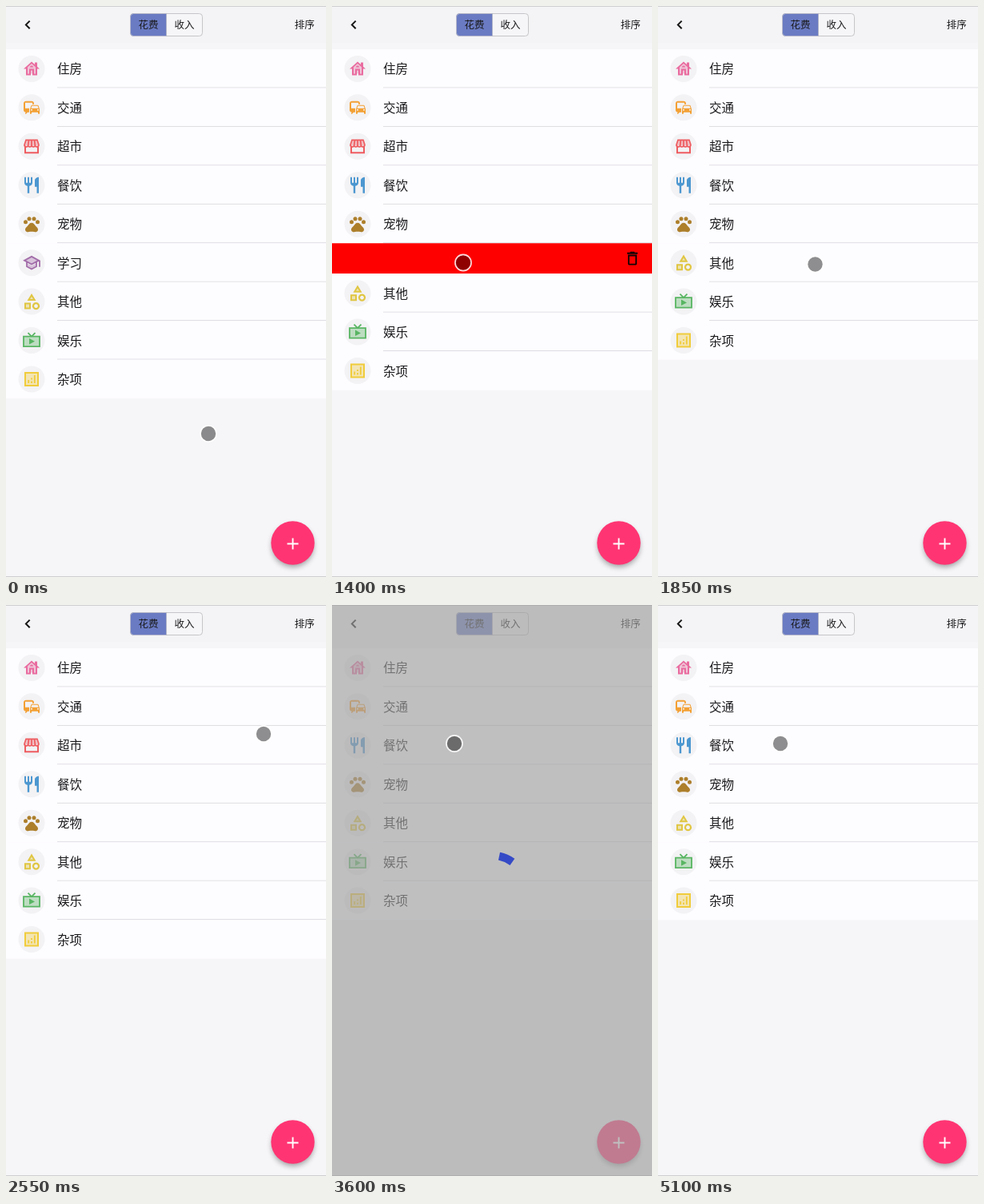
An HTML page for the animation above (5150 ms loop, 400x713 px).

```html
<!DOCTYPE html>
<html lang="zh-CN">
<head>
<meta charset="utf-8">
<title>分类列表</title>
<style>
  html, body { margin: 0; width: 100%; height: 100%; overflow: hidden; background: #f6f5f8; }
  svg { display: block; width: 100vw; height: 100vh; }
  text { font-family: "Noto Sans CJK SC", "Noto Sans CJK", sans-serif; fill: #1b1b1d; }
</style>
</head>
<body>
<svg id="stage" viewBox="0 0 400 713">
  <defs>
    <filter id="blur" x="-50%" y="-50%" width="200%" height="200%"><feGaussianBlur stdDeviation="3.5"/></filter>
  </defs>
  <rect width="400" height="713" fill="#f6f5f8"/>
  <rect width="400" height="46" fill="#f4f3f5"/>
  <rect id="sheet" y="54" width="400" fill="#fdfcff"/>
  <g id="rows"></g>
  <path d="M29.7 18.6L24.9 23.4L29.7 28.2" fill="none" stroke="#151515" stroke-width="2"/>
  <rect x="155.5" y="9.5" width="90" height="28" rx="4" fill="#f6f5f7" stroke="#c6c5c9"/>
  <path d="M200.5 9.5H159.5a4 4 0 0 0-4 4v20a4 4 0 0 0 4 4H200.5z" fill="#6a7bc3" stroke="#b4b7c9"/>
  <g font-size="12.5" text-anchor="middle">
    <text x="178" y="28.3">花费</text>
    <text x="223" y="28.3">收入</text>
    <text x="373.3" y="28.3">排序</text>
  </g>
  <circle cx="358.5" cy="674.5" r="26" fill="#000" opacity=".36" filter="url(#blur)"/>
  <circle cx="358.5" cy="670.5" r="27.2" fill="#ff3573"/>
  <path d="M351.5 671.5h14M358.5 664.5v14" stroke="#fff" stroke-width="1.9"/>
  <path d="M0 .5H400M0 712.5H400" stroke="#cfced1"/>
  <g id="loading">
    <rect width="400" height="713" fill="#a0a0a0" fill-opacity=".66"/>
    <path id="arc" fill="none" stroke="#354ac6" stroke-width="10"/>
  </g>
  <g id="pointer">
    <circle id="ring" r="21" fill="none" stroke="#000" stroke-width="1.8"/>
    <circle r="10" fill="none" stroke="#fff" stroke-width="1.8" opacity=".85"/>
    <circle r="9.2" fill="#000" fill-opacity=".44"/>
  </g>
</svg>
<script>
const LOOP = 5150, STEP = 50, ROW = 48.45, TOP = 54;
const $ = id => document.getElementById(id);

const line = (d, width = 2) =>
  `<path d="${d}" fill="none" stroke="currentColor" stroke-width="${width}"/>`;
const solid = d => `<path d="${d}" fill="currentColor" fill-rule="evenodd"/>`;
const tone = d => `<path d="${d}" fill="currentColor" opacity=".35"/>`;
const dot = (x, y, r) => `<circle cx="${x}" cy="${y}" r="${r}" fill="currentColor"/>`;

// Icons live in a 24-unit box.
const items = [
  ['住房', '#e96c9f', tone('M7 10.2l5-4.5 5 4.5V18H7z') +
    solid('M19 9.3V4h-3v2.6L12 3 2 12h3v8h6v-6h2v6h6v-8h3zM17 18h-2v-6H9v6H7v-7.8l5-4.5 5 4.5zM10 10h4c0-1.1-.9-2-2-2s-2 .9-2 2z')],
  ['交通', '#f3a033',
    solid('M12 4H5C3.3 4 2 5.3 2 7v8c0 1.7 1.3 3 3 3l-1 1v1h1l2-2h2v-5H4V6h9v2h2V7c0-1.7-1.3-3-3-3z') +
    solid('M20.6 9.7c-.2-.4-.5-.7-1-.7h-7.2c-.5 0-.8.3-1 .7L10 13.8v5.5c0 .4.3.7.7.7h.6c.4 0 .7-.4.7-.8V18h8v1.2c0 .4.3.8.7.8h.6c.4 0 .7-.3.7-.7v-5.5zM12.4 10h7.2l1 3h-9.2zM12 16a1 1 0 1 1 0-2 1 1 0 0 1 0 2zM20 16a1 1 0 1 1 0-2 1 1 0 0 1 0 2z')],
  ['超市', '#ee5c60', tone('M5 4h14l2 7H3z') +
    line('M5 4h14l1.8 5.5a2 2 0 0 1-4.4 1.5 2.3 2.3 0 0 1-4.4 0 2.3 2.3 0 0 1-4.4 0A2 2 0 0 1 3.2 9.5zM12 4v7M8.5 4l-.9 7M15.5 4l.9 7', 1.7) +
    line('M4 11.5V20h16v-8.5')],
  ['餐饮', '#4c97d0',
    solid('M11 9H9V2H7v7H5V2H3v7c0 2.1 1.7 3.8 3.8 4v9h2.4v-9c2.1-.2 3.8-1.9 3.8-4V2h-2zM16 6v8h2.5v8H21V2c-2.8 0-5 2.2-5 4z')],
  ['宠物', '#ad7f2b',
    dot(4.5, 9.5, 2.5) + dot(9, 5.5, 2.5) + dot(15, 5.5, 2.5) + dot(19.5, 9.5, 2.5) +
    solid('M17.3 14.9l-2.4-3c-1.6-1.8-4.2-1.8-5.8 0l-2.4 3c-1.3 1.3-3 2.7-2.7 4.7.3 1.1 1 2.1 2.4 2.4.7.1 3-.5 5.6-.5s4.9.6 5.6.5c1.4-.3 2.1-1.3 2.4-2.4.3-2-1.4-3.4-2.7-4.7z')],
  ['学习', '#a26ca9', tone('M12 4L3 9l9 5 9-5zM7 13v3l5 3 5-3v-3l-5 2.5z') +
    line('M12 4.2L3 9l9 4.9L21 9zM6 11.2v5.4l6 3.2 6-3.2v-5.4M22 9v8', 1.8)],
  ['其他', '#e0c642', tone('M12 4L8 10h8zM4 14h6v6H4z') +
    line('M12 3.9L8.3 10h7.4zM4 14.5h6v6H4z') + line('M17.5 14a3.5 3.5 0 1 0 .01 0z', 2.2)],
  ['娱乐', '#58b562', tone('M2 7h20v12H2z') +
    line('M2 7h20v12.5H2zM7.5 2.5L12 7l4.5-4.5', 1.8) + solid('M9 9.5v7.5l7-3.7z')],
  ['杂项', '#f0cc3b', tone('M4 4h16v16H4z') + line('M4 4h16v16H4z') +
    line('M8.2 17v-4M12 17v-2.5M12 12.5v-2M15.8 17V7', 1.8)]
];

const trash = solid('M6 19c0 1.1.9 2 2 2h8c1.1 0 2-.9 2-2V7H6zM8 9h8v10H8zM15.5 4l-1-1h-5l-1 1H5v2h14V4z');

$('rows').innerHTML = items.map(([label, color, icon], i) => `
  <g class="row">
    <rect class="red" width="400"/>
    <g class="trash" color="#140405">${trash}</g>
    <g class="content">
      <rect width="400" height="${ROW}" fill="#fdfcff"/>
      <circle cx="32" cy="24.4" r="16.5" fill="#f3f2f4"/>
      <g transform="translate(20 12.4)" color="${color}">${icon}</g>
      <text x="64" y="30.4" font-size="15.5">${label}</text>
      ${i < items.length - 1 ? '<path d="M64 48H400" stroke="#d9d8dc"/>' : ''}
    </g>
  </g>`).join('');

const rows = [...document.querySelectorAll('.row')].map(group => ({
  group,
  red: group.querySelector('.red'),
  trash: group.querySelector('.trash'),
  content: group.querySelector('.content')
}));

const clamp = (v, lo = 0, hi = 1) => Math.min(hi, Math.max(lo, v));
const lerp = (a, b, k) => a + (b - a) * k;
const span = (t, from, to) => clamp((t - from) / (to - from));
const smooth = k => k * k * (3 - 2 * k);
const linear = k => k;

// time, x, y, easing used to arrive there
const track = [
  [0, 253, 534, linear], [450, 341, 323, smooth], [830, 341, 323, linear],
  [1050, 274, 322.5, linear], [1280, 164, 320.5, linear], [1550, 164, 320.5, linear],
  [1850, 196.5, 322.5, smooth], [2450, 322, 161, smooth], [3040, 322, 161, linear],
  [3200, 213, 161.5, linear], [3300, 153, 173, linear], [LOOP, 153, 173, linear]
];

const swipes = [
  { row: 5, press: 700, drag: 830, release: 1280, startX: 341, busy: 1460, done: 1820 },
  { row: 2, press: 2700, drag: 3040, release: 3300, startX: 322, busy: 3520, done: 3900 }
];

function pointerAt(t) {
  const i = Math.max(1, track.findIndex(p => p[0] >= t));
  const a = track[i - 1], b = track[i];
  const k = b[3](span(t, a[0], b[0]));
  return [lerp(a[1], b[1], k), lerp(a[2], b[2], k)];
}

function swipeState(s, t) {
  if (t < s.drag) return { shift: 0, height: ROW };
  const pulled = Math.max(0, s.startX - pointerAt(Math.min(t, s.release))[0] - 4);
  return {
    shift: lerp(pulled, 400, smooth(span(t, s.release, s.release + 90))),
    height: ROW * (1 - smooth(span(t, s.release + 90, s.release + 190)))
  };
}

// Cubic curve (.4, 0, .2, 1), solved by bisection.
function fastOutSlowIn(x) {
  let lo = 0, hi = 1;
  for (let i = 0; i < 20; i++) {
    const s = (lo + hi) / 2, r = 1 - s;
    if (1.2 * s * r * r + .6 * s * s * r + s ** 3 < x) lo = s; else hi = s;
  }
  return lo * lo * (3 - 2 * lo);
}

function arcPath(age) {
  const cycle = (age / 1333) % 1;
  const head = 270 * fastOutSlowIn(clamp(cycle * 2));
  const tail = 270 * fastOutSlowIn(clamp(cycle * 2 - 1));
  const turn = age / 2222 * 360 + cycle * 90;
  const cap = 6.5;
  const from = turn + tail - cap, to = turn + head + cap;
  const at = deg => {
    const a = deg * Math.PI / 180;
    return `${200 + 43.8 * Math.sin(a)} ${356.5 - 43.8 * Math.cos(a)}`;
  };
  return `M${at(from)}A43.8 43.8 0 ${to - from > 180 ? 1 : 0} 1 ${at(to)}`;
}

function drawRow(row, y, { shift, height }) {
  row.group.setAttribute('transform', `translate(0 ${y})`);
  row.group.style.display = height > .5 ? '' : 'none';
  row.content.setAttribute('transform', `translate(${-shift} 0)`);
  row.red.style.display = row.trash.style.display = shift > 0 ? '' : 'none';
  const armed = span(shift, 70, 100), light = Math.round(82 * (1 - armed));
  row.red.setAttribute('fill', `rgb(255,${light},${light})`);
  row.red.setAttribute('height', height);
  const grow = (shift - 62) / 43;
  const scale = clamp(.57 + .36 * grow, 0, .93) * Math.min(1, height / 30);
  const x = 400 - Math.min(24.5, 21 + 3.5 * grow);
  row.trash.setAttribute('transform', `translate(${x} ${height / 2}) scale(${scale}) translate(-12 -12)`);
}

function render(t) {
  let y = TOP;
  rows.forEach((row, i) => {
    const swipe = swipes.find(s => s.row === i);
    const state = swipe ? swipeState(swipe, t) : { shift: 0, height: ROW };
    drawRow(row, y, state);
    y += state.height;
  });
  $('sheet').setAttribute('height', y - TOP);

  const busy = swipes.find(s => t >= s.busy && t < s.done);
  $('loading').style.display = busy ? '' : 'none';
  if (busy) $('arc').setAttribute('d', arcPath(t - busy.busy));

  $('pointer').setAttribute('transform', `translate(${pointerAt(t)})`);
  $('ring').style.display = swipes.some(s => t >= s.press && t < s.release) ? '' : 'none';
}

const start = performance.now();
function tick() {
  const t = (performance.now() - start) % LOOP;
  render(Math.floor(t / STEP) * STEP);
  requestAnimationFrame(tick);
}
tick();
</script>
</body>
</html>
```
